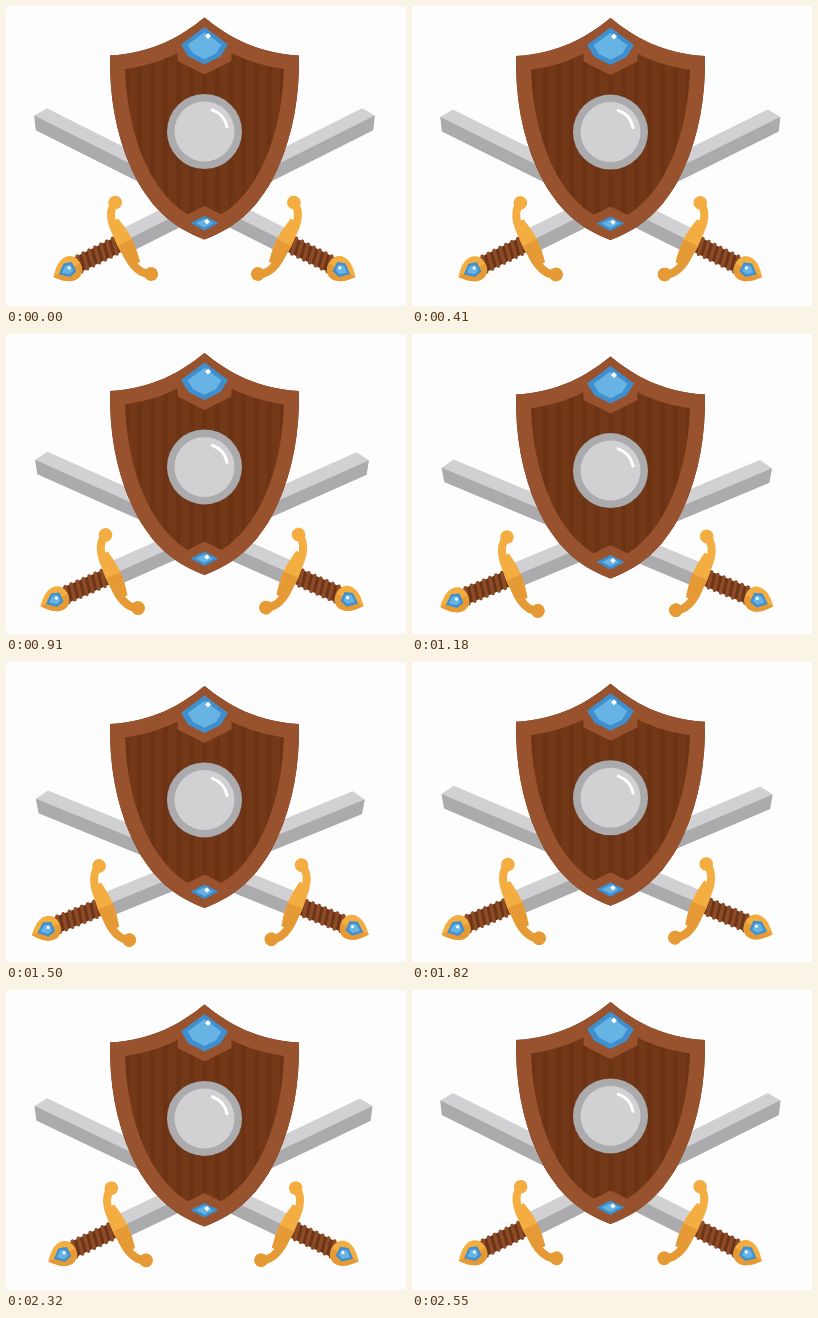
An HTML page with a canvas that plays this animation: 400 px wide and 300 px high, repeating every 2600 ms.

```html
<!DOCTYPE html>
<html lang="en">
<head>
<meta charset="utf-8">
<title>Shield and swords</title>
<style>
  html, body { margin: 0; width: 100%; height: 100%; overflow: hidden; background: #fefdfe; }
  canvas { display: block; width: 400px; height: 300px; }
</style>
</head>
<body>
<canvas id="stage" width="400" height="300"></canvas>
<script>
const ctx = document.getElementById('stage').getContext('2d');
const LOOP = 2600, FPS = 22, FRAMES = 57, LAG = 165;
const MID = 198.5;
const TAU = Math.PI * 2;
const C = {
  bg: '#fefdfe', wood: '#733817', grain: '#6c3414', rim: '#98522d',
  steel: '#d1d0d2', steelDark: '#abaaad',
  gold: '#f3ad41', goldDark: '#e59a36',
  gem: '#3f8fcf', gemLight: '#67b3e4',
  grip: '#6c3517', ridge: '#8d4c27'
};

// Closed shape, symmetric about the x axis, from an SVG path of one half.
function mirrored(half) {
  const shape = new Path2D(half);
  shape.addPath(new Path2D(half), new DOMMatrix([1, 0, 0, -1, 0, 0]));
  return shape;
}

// Closed shape, symmetric about the y axis, from its left half, top to bottom.
function symmetricPoly(color, half) {
  const right = half.map(([x, y]) => [-x, y]).reverse();
  ctx.fillStyle = color;
  ctx.fill(new Path2D('M' + half.concat(right).join('L') + 'Z'));
}

function disc(x, y, r, color) {
  ctx.fillStyle = color;
  ctx.beginPath();
  ctx.arc(x, y, r, 0, TAU);
  ctx.fill();
}

function stroke(path, width, color, cap = 'round') {
  ctx.strokeStyle = color;
  ctx.lineWidth = width;
  ctx.lineCap = cap;
  ctx.stroke(path);
}

// Gem outline with a smaller light copy around the centre and a sparkle.
function gem(x, y, inset, half, [sx, sy, size]) {
  ctx.save();
  ctx.translate(x, y);
  symmetricPoly(C.gem, half);
  symmetricPoly(C.gemLight, half.map(p => p.map(v => v * inset)));
  ctx.translate(sx, sy);
  symmetricPoly('#fff', [[0, -size], [-size, 0], [0, size]]);
  ctx.restore();
}

// Paints in the light tone, then repaints the lower half in the dark one.
function twoTone(paint, light, dark) {
  paint(light);
  ctx.save();
  ctx.beginPath();
  ctx.rect(-120, 0, 420, 100);
  ctx.clip();
  paint(dark);
  ctx.restore();
}

const bladeShape = mirrored('M0 0V-12.3H271.5L279.5 0Z');
const pommelShape = mirrored('M-50 0C-50 -8 -55 -12.5 -61 -12.5C-69 -12.5 -75 -6 -80 0Z');
const guardCore = mirrored('M4 -24C6 -14 7 -8 7 0H-9C-9 -9 -7 -17 -5 -24Z');
const guardArm = 'M8 -40C-4 -34 -6 -16 -3 0';

function fillWith(shape) {
  return color => { ctx.fillStyle = color; ctx.fill(shape); };
}

function grip() {
  ctx.fillStyle = C.grip;
  ctx.fillRect(-56, -8, 52, 16);
  for (let x = -51; x < -6; x += 6.6) {
    stroke(new Path2D(`M${x + 1.5} -8L${x - 1.5} 8`), 3.5, C.ridge);
  }
}

function guard(color) {
  stroke(mirrored(guardArm), 8, color);
  fillWith(guardCore)(color);
  for (const y of [-40, 40]) disc(8.5, y, 6.8, color);
}

// Pommel at lower left, tip at upper right; q runs from rest to full sway.
function sword(q, dx, dy) {
  ctx.save();
  ctx.translate(215 + dx * q, 187 + dy * q);
  ctx.rotate(4.7 * q * Math.PI / 180);
  ctx.translate(-96, 48);
  ctx.rotate(-26.67 * Math.PI / 180);

  twoTone(fillWith(bladeShape), C.steel, C.steelDark);
  grip();
  twoTone(fillWith(pommelShape), C.gold, C.goldDark);
  ctx.save();
  ctx.translate(-64, 0);
  ctx.rotate(Math.PI / 2);
  gem(0, 0, 0.65, [[-5, -7], [-7.5, 1], [0, 10]], [-1, -2, 2]);
  ctx.restore();
  ctx.translate(0, 1.2);
  twoTone(guard, C.gold, C.goldDark);
  ctx.restore();
}

const shieldShape = new Path2D('M0 11.5C-24 31 -52 47 -94.5 49.5C-95 90 -89 127 -73 163' +
  'C-57 198 -34 221 0 233.5C34 221 57 198 73 163C89 127 95 90 94.5 49.5C52 47 24 31 0 11.5Z');

function shield(dy) {
  ctx.save();
  ctx.translate(MID, dy);

  ctx.save();
  ctx.clip(shieldShape);
  ctx.fillStyle = C.wood;
  ctx.fillRect(-100, 0, 200, 240);
  ctx.fillStyle = C.grain;
  for (let x = -78; x <= 78; x += 13) ctx.fillRect(x - 2.5, 50, 5, 170);
  stroke(shieldShape, 30, C.rim, 'butt');
  symmetricPoly(C.rim, [[0, 12], [-27, 32], [-27, 55], [0, 68.5]]);
  symmetricPoly(C.rim, [[0, 200], [-28, 214], [0, 232]]);
  ctx.restore();

  gem(0, 39.5, 0.72, [[0, -18.5], [-23.5, -1], [-16, 11], [0, 19]], [3.5, -9.5, 3]);
  gem(0, 217, 0.6, [[0, -7], [-14, 0], [0, 7.5]], [2.5, -1.5, 2.7]);

  disc(0, 125.5, 37.5, C.steelDark);
  disc(0, 125.5, 30, C.steel);
  const glint = new Path2D();
  glint.arc(0, 125.5, 23, -1.23, -0.2);
  stroke(glint, 3, '#fff');
  ctx.restore();
}

function sway(t) {
  return (1 - Math.cos(TAU * (t - LAG) / LOOP)) / 2;
}

function draw(ms) {
  const frame = Math.min(FRAMES - 1, Math.floor((ms % LOOP + 5) * FPS / 1000));
  const q = sway(frame * 1000 / FPS) - sway(0);

  ctx.fillStyle = C.bg;
  ctx.fillRect(0, 0, 400, 300);
  sword(q, -16.3, 16.4);
  ctx.save();
  ctx.translate(2 * MID, 0);
  ctx.scale(-1, 1);
  sword(q, -7.6, 15.6);
  ctx.restore();
  shield(13 * q);
}

const start = performance.now();
function tick() {
  draw(performance.now() - start);
  requestAnimationFrame(tick);
}
tick();
</script>
</body>
</html>
```
